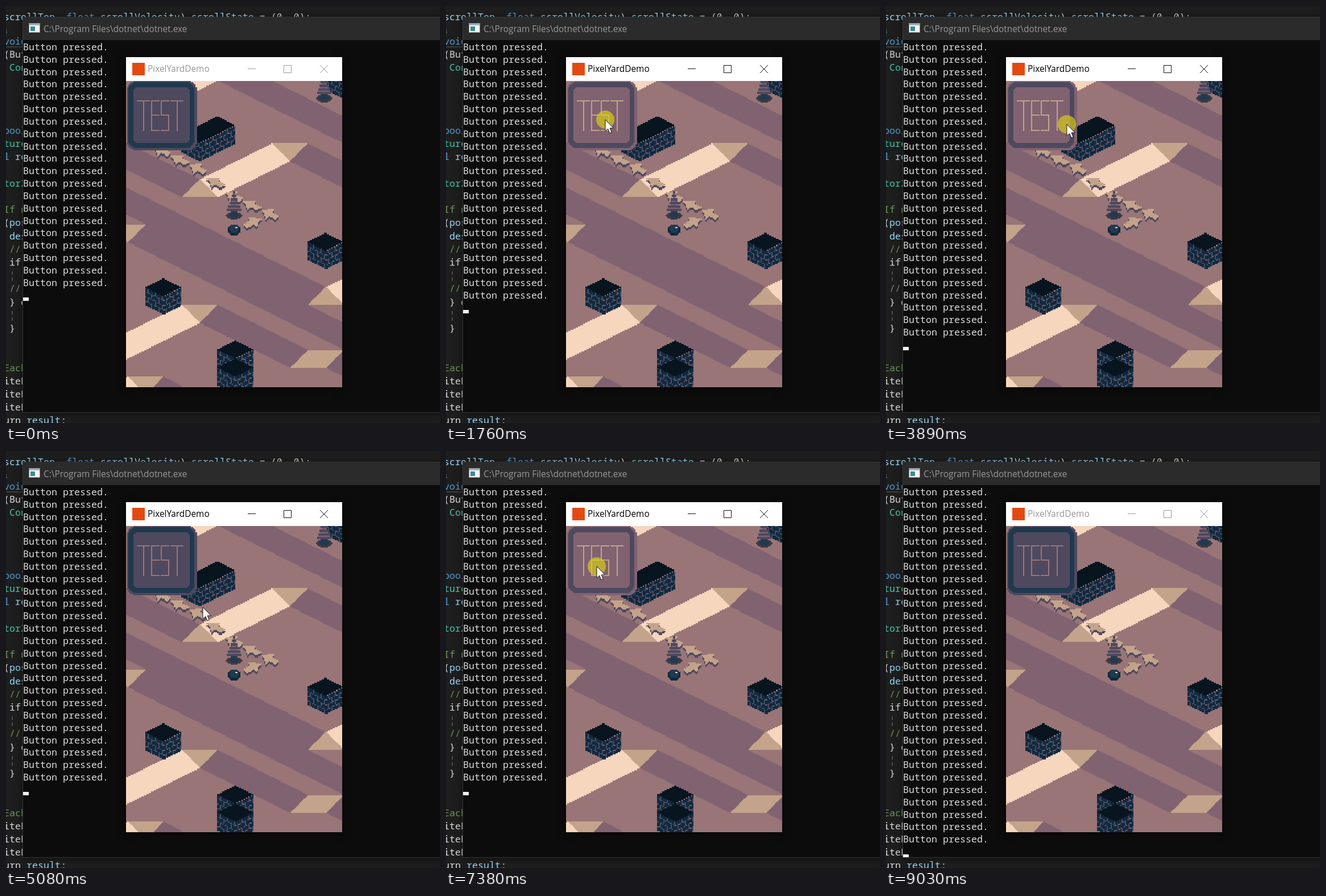
These frames come from a looping animation (763 px wide and 734 px high, 9080 ms). An HTML page with a canvas:

```html
<!DOCTYPE html>
<html lang="en">
<head>
<meta charset="utf-8">
<title>Button test</title>
<style>
html, body { margin: 0; width: 100%; height: 100%; overflow: hidden; background: #1e1e1e; }
#stage { position: relative; width: 763px; height: 734px; overflow: hidden; background: #1e1e1e; }
#stage * { position: absolute; margin: 0; }
#stage b { position: static; font-weight: inherit; }
pre { font: 500 16.67px "Noto Sans Mono", "DejaVu Sans Mono", monospace; color: #dcdcdc; }
.code { left: -4px; line-height: 23.2px; }
.key { color: #569cd6; } .type { color: #4ec9b0; } .var { color: #9cdcfe; }
.note { color: #6a9955; } .num { color: #b5cea8; } .dim { color: #6b6b6b; }
#console { left: 29px; top: 19px; width: 740px; height: 695px; background: #0c0c0c; border: 1px solid #353535; box-shadow: 0 2px 14px rgba(0,0,0,.5); overflow: hidden; }
#bar { left: 0; top: 0; width: 740px; height: 40px; background: #2b2b2b; }
.title { font: 15.4px/24px "Open Sans", "Noto Sans", sans-serif; white-space: pre; }
#log { left: 0; top: 41px; line-height: 21.83px; }
#caret { left: 0; width: 10px; height: 6px; background: #f2f2f2; }
#game { left: 211px; top: 90px; width: 380px; height: 581px; background: #fff; box-shadow: 0 3px 12px rgba(0,0,0,.5); }
#view { left: 0; top: 42px; width: 380px; height: 539px; image-rendering: pixelated; }
#badge { left: 11px; top: 10px; width: 22px; height: 22px; background: #e24a12; }
#mouse { left: 0; top: 0; overflow: visible; }
</style>
</head>
<body>
<div id="stage">
  <pre class="code" style="top:7px"><b class="var">scrollTop</b>, <b class="key">float</b> <b class="var">scrollVelocity</b>) <b class="var">scrollState</b> = (<b class="num">0</b>, <b class="num">0</b>);</pre>
  <pre class="code dim" style="top:32px;font-size:12px">s</pre>
  <pre class="code" style="top:50px"><b class="key">void</b>
(But
 <b class="type">Con</b></pre>
  <div style="left:0;top:71px;width:30px;height:2px;background:#3c3c3c"></div>
  <pre class="code" style="top:207px"><b class="key">bool</b>
<b class="type">ture</b>
<b class="key">l</b> <b class="var">re</b>

<b class="type">tor2</b>

<b class="note">If n</b>
(<b class="var">pos</b>
<b class="var"> des</b>
<b class="note"> //</b>
 if
<b class="dim"> ¦</b>
<b class="note"> //</b>
 } e
<b class="dim"> ¦</b>
 }


<b class="note">Each</b>
iteE
iteE
iteE
urn <b class="var">result</b>;</pre>
  <div id="console">
    <div id="bar">
      <svg width="20" height="18" style="left:10px;top:10px">
        <rect x=".5" y=".5" width="19" height="16" fill="#f4f4f4" stroke="#8a8a8a"/>
        <rect x="1" y="1" width="18" height="3" fill="#9db0bd"/>
        <rect x="3" y="6" width="8" height="8" fill="#3a8a98"/>
      </svg>
      <div class="title" style="left:36px;top:9px;color:#999">C:\Program Files\dotnet\dotnet.exe</div>
    </div>
    <pre id="log"></pre>
    <div id="caret"></div>
  </div>
  <div id="game">
    <div id="badge"></div>
    <div id="name" class="title" style="left:38px;top:9px">PixelYardDemo</div>
    <svg id="controls" width="380" height="42" fill="none">
      <path d="M214 20.5h14M277.500 14.500h13v13h-13zM341 14l14 14M355 14l-14 14"/>
    </svg>
    <canvas id="view" width="180" height="256"></canvas>
  </div>
  <svg id="mouse" width="1" height="1">
    <circle id="press" r="16" fill="#dcd214" fill-opacity=".66"/>
    <path d="M0 0V20.500L4.700 16.200 7.900 23.800 11.300 22.300 8.100 14.900H14.500Z" fill="#fff" stroke="#111"/>
  </svg>
</div>
<script>
const LOOP = 9080;
const $ = id => document.getElementById(id);

// ---- pixel art, drawn on a 180 x 256 grid ----
const K = '#08141e', N = '#0f2a3f', B = '#20394f', P = '#f6d6bd',
      T = '#c3a38a', M = '#997577', D = '#816271', G = '#4e495f';
const HX = 15, HY = 7.5; // half a tile
const g = $('view').getContext('2d');

function rect(col, x, y, w, h) {
  g.fillStyle = col;
  g.fillRect(x, y, w, h);
}

// Hard-edged polygon from a list of [x, y] points
function poly(col, pts) {
  for (let y = 0; y < 256; y++) {
    const cuts = [], c = y + .5;
    pts.forEach(([x0, y0], i) => {
      const [x1, y1] = pts[(i + 1) % pts.length];
      if ((y0 <= c) !== (y1 <= c)) cuts.push(x0 + (c - y0) / (y1 - y0) * (x1 - x0));
    });
    cuts.sort((a, b) => a - b);
    for (let i = 0; i + 1 < cuts.length; i += 2) {
      const a = Math.round(cuts[i]);
      rect(col, a, y, Math.round(cuts[i + 1]) - a, 1);
    }
  }
}

function disc(col, cx, cy, rx, ry) {
  for (let y = Math.floor(cy - ry); y < cy + ry; y++) {
    const k = 1 - ((y + .5 - cy) / ry) ** 2;
    if (k <= 0) continue;
    const w = Math.round(rx * Math.sqrt(k));
    rect(col, cx - w, y, 2 * w, 1);
  }
}

// Corner of a raised floor with its apex on tile point (i, j).
// side 1 opens upwards, -1 downwards; lit and dark are the lengths of its two slopes.
function corner(i, j, side, lit, dark) {
  const u = 1.5 + i * HX, v = 7.2 + j * HY;
  const end = s => [u + s * HX, v - side * 2 * HY];
  const slope = (col, s, n) => {
    const [x, y] = end(s), dx = s * n * HX, dy = side * n * HY;
    poly(col, [[u, v], [x, y], [x + dx, y + dy], [u + dx, v + dy]]);
  };
  slope(P, -side, lit);
  slope(D, side, dark);
  poly(T, [[u, v], end(-1), end(1)]);
}

function ground() {
  rect(M, 0, 0, 180, 256);
  corner(5, -1, 1, 3, 8);
  corner(9, 8, 1, 4, 4);
  corner(4, 10, -1, 0, 6);
  corner(11, 22, -1, 2, 13);
  corner(0, 17, 1, 0, 13);
  corner(4, 26, 1, 5, 5);
  corner(10, 29, -1, 0, 0);
  corner(11, 31, 1, 0, 2);
  corner(1, 34, 1, 2, 1);
}

// Brick block; (i, j) is the tile point of the front corner of its top
function block(i, j, n = 1) {
  const u = 1 + i * HX, v = Math.floor(j * HY);
  const column = (x, top, base, joint) => {
    for (let k = 0; k < 15; k++) {
      const row = k >> 2, shift = x + row * 3;
      const gap = k % 4 === 3 ? shift % 4 : shift % 6 === 0;
      rect(gap ? joint : base, x, top + k, 1, 1);
    }
  };
  for (let k = 0; k < HX; k++) column(u - HX + k, Math.round(v - HY + k / 2), N, G);
  for (let k = 0; k < HX * n; k++) column(u + k, Math.round(v - k / 2), N, k % 3 ? G : D);
  poly(K, [[u, v], [u + HX * n, v - HY * n], [u + HX * (n - 1), v - HY * (n + 1)], [u - HX, v - HY]]);
}

function tree(u, v) {
  disc('#3d3a46', u, v + 20.5, 6.5, 3.5);
  disc(B, u, v + 20, 4, 2.5);
  rect(B, u - 1, v + 15, 2, 5);
  for (let k = 0; k < 17; k++) {
    const gap = k % 3 === 2;
    const w = Math.max(1, Math.round(.4 + k * .37 - gap));
    rect(gap ? D : G, u - w, v + k, 2 * w, 1);
  }
}

const ARROW = [[0, 1], [11, 0], [10, 3], [16, 6], [12, 9], [7, 6], [4, 9], [3, 4]];

function arrow(x, y, flip = false) {
  const at = dy => ARROW.map(([a, b]) => [x + (flip ? 16 - a : a), y + b + dy]);
  poly(G, at(2));
  poly(T, at(0));
}

// One arrow per tile; the far ones stand on the raised floor
function arrows() {
  for (let i = 0; i < 7; i++) {
    const lift = i < 3 ? 8 : i === 3 ? 4 : 0;
    arrow(22 + i * HX, 62 + i * HY - lift);
  }
  arrow(97, 114, true);
}

function plate(col, x, y, w, h, r) {
  for (let i = 0; i < h; i++) {
    const e = Math.min(i, h - 1 - i);
    const cut = e < r ? r - Math.round(Math.sqrt(r * r - (r - e - .5) ** 2)) : 0;
    rect(col, x + cut, y + i, w - 2 * cut, 1);
  }
}

function button(down) {
  const [rim, edge, fill, ink] = down ? [D, G, D, T] : [G, B, G, M];
  plate(rim, 1, 0, 58, 58, 8);
  plate(edge, 2, 1, 55, 55, 7);
  plate(fill, 6, 5, 47, 47, 4);
  const bar = (x, y, w, h) => rect(ink, x, y, w, h);
  for (const x of [9, 37]) { bar(x, 16, 11, 1); bar(x + 5, 16, 1, 26); }
  for (const y of [16, 28, 41]) { bar(21, y, 7, 1); bar(29, y, 7, 1); }
  bar(21, 16, 1, 26);
  bar(29, 16, 1, 13);
  bar(35, 28, 1, 14);
}

function drawGame(path, down) {
  ground();
  block(12, 0);
  block(4, 7, 2);
  block(11, 19);
  block(2, 24);
  block(6, 31);
  block(6, 33);
  if (path) arrows();
  tree(90, 92);
  tree(165, -6);
  disc(N, 90, 124.5, 5, 5);
  disc(B, 90, 123.5, 4, 4);
  rect(P, 91, 122, 2, 1);
  button(down);
}

// ---- timeline: pointer stops as [time, x, y] ----
const TRACK = [
  [210, 614, 722], [900, 222, 206], [1120, 262, 206], [1760, 280, 200], [2810, 300, 197],
  [3250, 374, 222], [3710, 296, 202], [4200, 367, 222], [4680, 360, 193], [5080, 346, 275],
  [5420, 236, 288], [6540, 381, 214], [6850, 560, 205], [7380, 265, 203], [8080, 265, 203],
  [8520, 673, 733]
];
const hold = (times, ms) => times.map(t => [t, t + ms]);
const burst = Array.from({ length: 5 }, (_, i) => 7380 + i * 170);
const PRESSES = [
  ...hold([1280, 1700, 2250, 2480], 130),
  ...hold([2900, 3800], 500),
  ...hold(burst, 80)
];

function mouseAt(t) {
  const i = TRACK.findIndex(k => k[0] > t);
  if (i < 1) return TRACK.at(i).slice(1);
  const [t0, x0, y0] = TRACK[i - 1], [t1, x1, y1] = TRACK[i];
  const k = (t - t0) / (t1 - t0), e = k * k * (3 - 2 * k);
  return [x0 + (x1 - x0) * e, y0 + (y1 - y0) * e];
}

const onButton = ([x, y]) => x > 213 && x < 335 && y > 132 && y < 255;
const RELEASES = PRESSES.map(p => p[1]).filter(t => onButton(mouseAt(t)));

let scene = '', shown = -1;

function render(t) {
  const pos = mouseAt(t);
  const held = PRESSES.some(([a, b]) => t >= a && t < b);
  const active = t >= 1280 && t < 9030;
  const path = t < 6000 || t >= 7000;
  const down = held && onButton(pos);

  const key = `${path} ${down}`;
  if (key !== scene) drawGame(path, down);
  scene = key;

  const lines = 20 + RELEASES.filter(r => r <= t).length;
  if (lines !== shown) {
    $('log').textContent = 'Button pressed.\n'.repeat(lines);
    $('caret').style.top = 56.5 + lines * 21.83 + 'px';
    shown = lines;
  }

  $('name').style.color = active ? '#000' : '#999';
  $('controls').style.stroke = active ? '#111' : '#999';
  $('mouse').style.display = t >= 210 && t < 8520 ? '' : 'none';
  $('mouse').style.transform = `translate(${pos[0]}px,${pos[1]}px)`;
  $('press').style.display = held ? '' : 'none';
}

const start = performance.now();
function tick() {
  render((performance.now() - start) % LOOP);
  requestAnimationFrame(tick);
}
tick();
</script>
</body>
</html>
```
